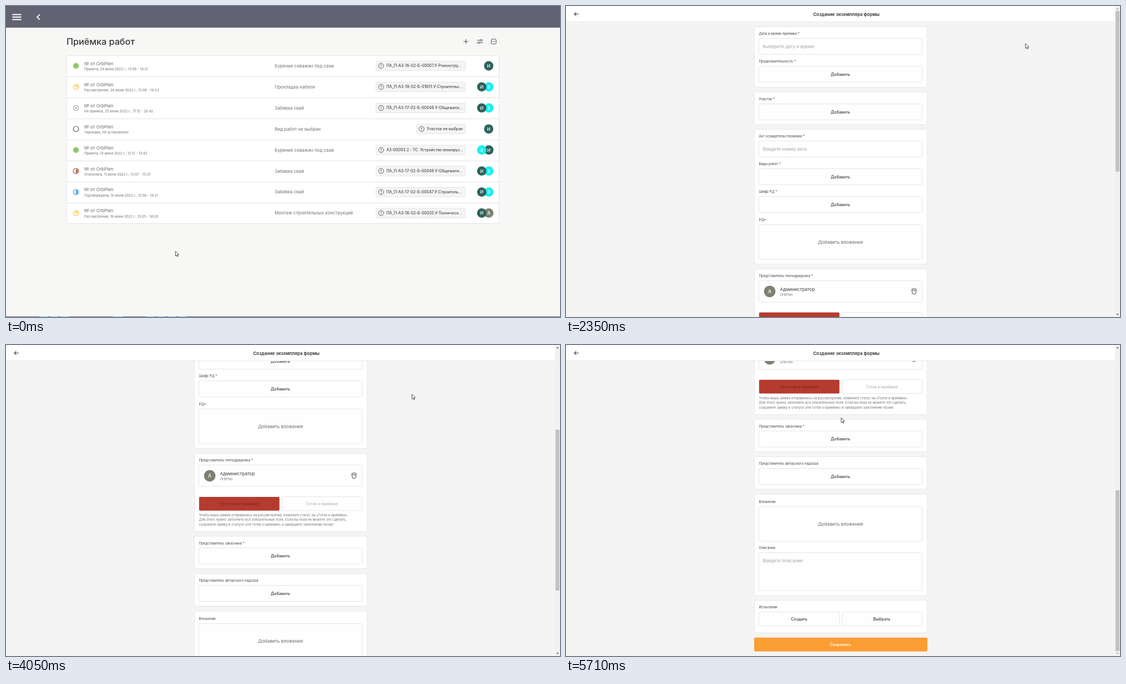
Recreate the animation shown at these times as an HTML page. Size 998 by 561 pixels, loop 5.74 s.

```html
<!DOCTYPE html>
<html lang="ru">
<head>
<meta charset="utf-8">
<title>Приёмка работ</title>
<style>
html, body { margin: 0; width: 100%; height: 100%; overflow: hidden; background: #f7f7f6; }
svg { display: block; width: 100vw; height: 100vh; }
text { font-family: Inter, "Open Sans", sans-serif; white-space: pre; }
</style>
</head>
<body>
<svg id="stage" viewBox="0 0 998 561" preserveAspectRatio="none"></svg>
<script>
const LOOP = 5740;
const OPEN_FORM = 2170;
const BRAND = 'OrbPlen';

// Drawing helpers; text is placed by the middle of its capitals.
const text = (x, y, s, size, fill = '#666', weight = 400, anchor = 'start') =>
  `<text x="${x}" y="${y + size * 0.36}" font-size="${size}" fill="${fill}" font-weight="${weight}" text-anchor="${anchor}">${s}</text>`;
const rect = (x, y, x2, y2, fill, stroke = 'none', r = 2) =>
  `<rect x="${x}" y="${y}" width="${x2 - x}" height="${y2 - y}" rx="${r}" fill="${fill}" stroke="${stroke}"/>`;
const circle = (x, y, r, fill, stroke = 'none', w = 1) =>
  `<circle cx="${x}" cy="${y}" r="${r}" fill="${fill}" stroke="${stroke}" stroke-width="${w}"/>`;
const line = (d, stroke, w = 1, cap = 'round') =>
  `<path d="${d}" fill="none" stroke="${stroke}" stroke-width="${w}" stroke-linecap="${cap}" stroke-linejoin="round"/>`;
const shape = (d, fill) => `<path d="${d}" fill="${fill}"/>`;
const group = (id, body) => `<g id="${id}">${body}</g>`;

// ---- List page ----
const status = {
  done: y => circle(126, y, 4.9, '#d5ecc5', '#6db843') + circle(126, y, 4, '#70bd42'),
  review: y => circle(126, y, 4.8, '#fdf3cf', '#f1c648', 1.2) +
    shape(`M126 ${y}v-3.4a3.4 3.4 0 0 1 3.4 3.4z`, '#f1bd2e'),
  refused: y => rect(121.8, y - 4.3, 130.2, y + 4.3, '#fff', '#77797f', 2) +
    line(`M124.4 ${y - 1.7}l3.3 3.4m0 -3.4l-3.3 3.4`, '#66686e'),
  draft: y => circle(126, y, 4.8, '#fff', '#33363b', 1.2),
  rejected: y => half(y, '#a4472f', '#f6e6e1'),
  confirmed: y => half(y, '#2d90d9', '#dff0fb')
};
const half = (y, c, light) => circle(126, y, 4.8, light, c, 1.2) +
  shape(`M126 ${y - 3.5}a3.5 3.5 0 0 1 0 7z`, c);

const avatarColor = { 'И': '#2d625c', 'З': '#1fedf0', 'А': '#7d8170' };
const avatar = (x, y, ch, r = 8.4, size = 8) =>
  circle(x, y, r, avatarColor[ch]) + text(x, y, ch, size, '#fff', 500, 'middle');

const rows = [
  ['done', 'Принята, 29 июня 2022 г., 13:06 - 14:21', 'Бурение скважин под сваи', 'ПА_П-АЗ-16-02-Б-00007.У-Реконстру...', 'И'],
  ['review', 'Рассмотрение, 24 июня 2022 г., 13:08 - 14:23', 'Прокладка кабеля', 'ПА_П-АЗ-18-02-Б-01651.У-Строительс...', 'ИЗ'],
  ['refused', 'Не принята, 25 июня 2022 г., 17:12 - 20:42', 'Забивка свай', 'ПА_П-АЗ-17-02-Б-00049.У-Общежити...', 'ИЗ'],
  ['draft', 'Черновик, Не установлено', 'Вид работ не выбран', 'Участок не выбран', 'И'],
  ['done', 'Принята, 14 июня 2022 г., 12:12 - 13:42', 'Бурение скважин под сваи', 'АЗ-00003.2 - ТС. Устройство межярус...', 'ЗИ'],
  ['rejected', 'Отклонена, 11 июня 2022 г., 13:07 - 13:37', 'Забивка свай', 'ПА_П-АЗ-17-02-Б-00049.У-Общежити...', 'ИЗ'],
  ['confirmed', 'Подтверждена, 10 июня 2022 г., 13:06 - 14:21', 'Забивка свай', 'ПА_П-АЗ-17-02-Б-00047.У-Строитель...', 'ИЗ'],
  ['review', 'Рассмотрение, 16 июня 2022 г., 13:05 - 14:20', 'Монтаж строительных конструкций', 'ПА_П-АЗ-16-02-Б-00035.У-Техническ...', 'ИА']
];
const ROW = 37.93;
const rowY = i => 108 + i * ROW;

function listRow([kind, sub, work, place, people], i) {
  const y = rowY(i);
  const left = kind === 'draft' ? 739.5 : 666.5;
  let s = i ? line(`M110 ${Math.round(y - ROW / 2) + 0.5}H888`, '#e3e3e5', 1, 'butt') : '';
  s += text(141, y - 4, '№ от ' + BRAND, 8, '#66676b');
  s += text(141, y + 6, sub, 6.05, '#6c6d72');
  s += text(484, y, work, 8, '#707176');
  s += rect(left, y - 8.5, 827.5, y + 8.5, '#f5f5f6', '#e3e3e5');
  s += circle(left + 9.2, y, 4.6, 'none', '#4a4b50', 0.9);
  s += line(`M${left + 9.2} ${y - 2.4}v2.7m0 2v.1`, '#4a4b50');
  s += text(left + 18.7, y, place, 6.9, '#45464b', 500);
  // The left avatar lies on top.
  if (people[1]) s += avatar(869.8, y, people[1]);
  return s + avatar(people[1] ? 857 : 869.5, y, people[0]);
}

function listPage() {
  const ink = '#4b4c51';
  let s = rect(0, 0, 998, 561, '#f7f7f6', 'none', 0) + rect(0, 0, 998, 39, '#616373', 'none', 0);
  s += line('M12 15.5h15M12 20h15M12 24.5h15', '#fff', 1.8);
  s += line('M60.5 15.8L56 20l4.5 4.2', '#fff', 1.8);
  s += text(109, 64, 'Приёмка работ', 16.2, '#36373b', 500);
  s += group('hover', rect(818, 54, 839, 74, '#ececec', 'none', 3) + circle(828.5, 64, 8.5, '#c9c9c9'));
  s += line('M824.8 64h7.6M828.6 60.2v7.6', ink);
  s += line('M849 61.8h5.2m3.4 0h1M849 66.2h1m3.4 0h5.2', ink);
  s += circle(855.9, 61.8, 1.6, 'none', ink) + circle(851.7, 66.2, 1.6, 'none', ink);
  s += rect(874, 59.5, 883, 68.5, 'none', ink, 2.5);
  s += [876.2, 878.5, 880.8].map(x => circle(x, 64, 0.7, ink)).join('');
  s += rect(109.5, 89.5, 888.5, 392.5, '#fff', '#e3e3e5');
  s += rows.map(listRow).join('');
  s += group('marks', rows.map((r, i) => status[r[0]](rowY(i))).join(''));
  s += group('tip',
    `<rect x="797" y="79" width="63" height="21.5" rx="2.5" fill="#fff" filter="url(#shade)"/>` +
    text(805.5, 89.5, 'Создать', 8.1, '#6d6e73') + rect(843, 83.5, 855, 95.5, '#efeff0') +
    text(849, 89.5, 'C', 5.8, '#77787c', 400, 'middle'));
  s += group('taskbar', rect(0, 560, 998, 561, '#5d6266', 'none', 0) +
    [[60, 76], [80, 94], [98, 113], [193, 211], [252, 267], [272, 287], [291, 306], [310, 325]]
      .map(([a, b]) => rect(a, 560, b, 561, '#74bde4', 'none', 0)).join(''));
  return s;
}

// ---- Form page ----
const L = 347.5, R = 641.5, MID = 494.5;
const EDGE = '#e5e5e6';
const card = (y, y2) => rect(339.5, y, 650.5, y2, '#fff', '#e8e8e9');
const label = (y, s) => text(L, y, s, 6.1, '#3f4044');
const box = (y, y2, x = L, x2 = R) => rect(x, y, x2, y2, '#fefefe', EDGE);
const bold = (x, y, s, fill = '#48494d') => text(x, y, s, 7.1, fill, 600, 'middle');
const button = (y, s = 'Добавить') => box(y, y + 29) + bold(MID, y + 14.5, s);
const input = (y, s) => box(y, y + 29) + text(354.5, y + 14.8, s, 8, '#a4a5a9');
const upload = y => box(y, y + 62.5) + text(MID, y + 31.3, 'Добавить вложения', 8.2, '#66676b', 400, 'middle');

function formBody() {
  let s = card(37.5, 146.5) + label(50, 'Дата и время приёмки *') + input(58.5, 'Выберите дату и время');
  s += label(100, 'Продолжительность *') + button(108.5);
  s += card(155, 213.5) + label(167.5, 'Участок *') + button(176.5);
  s += card(222.5, 465.5) + label(235, 'Акт освидетельствования *') + input(243.5, 'Введите номер акта');
  s += label(285, 'Виды работ *') + button(293.5);
  s += label(335, 'Шифр РД *') + button(343.5);
  s += label(386, 'РД*') + upload(394.5);

  s += card(474.5, 615.5) + label(487, 'Представитель генподрядчика *') + box(495.5, 534);
  s += avatar(367, 514.8, 'А', 10.4, 8.4);
  s += text(385.5, 510.8, 'Администратор', 8.1, '#3a3b3f') + text(385.5, 520.5, BRAND, 6, '#77787c');
  s += `<path d="M622.8 511.5l1.2 7q.3 1.3 1.6 1.3h2.8q1.3 0 1.6-1.3l1.2-7" fill="#e9e9e9" stroke="#55565a"/>`;
  s += `<ellipse cx="627" cy="511.3" rx="4.4" ry="1.5" fill="#fff" stroke="#45464a"/>`;
  s += rect(347.8, 552.8, 492.6, 577.6, '#b53b2f') + text(420, 565.2, 'Не готов к приёмке', 7.2, '#7c2a23', 500, 'middle');
  s += box(552.5, 577.5, 497.5) + text(569, 565.2, 'Готов к приёмке', 7.1, '#b2b3b6', 500, 'middle');
  s += ['Чтобы ваша заявка отправилась на рассмотрение, измените статус на «Готов к приёмке».',
    'Для этого нужно заполнить все обязательные поля. Если вы пока не можете это сделать,',
    'сохраните заявку в статусе «Не готов к приёмке» и завершите заполнение позже.']
    .map((t, i) => text(L, 585.7 + i * 8.4, t, 6, '#717276')).join('');

  s += card(624, 682.5) + label(636.5, 'Представитель заказчика *') + button(645);
  s += card(691.5, 750) + label(704, 'Представитель авторского надзора') + button(712.5);
  s += card(759, 942) + label(773, 'Вложения') + upload(781.5);
  s += label(856.3, 'Описание') + box(864.5, 933) + text(354.5, 879.3, 'Введите описание', 8, '#a4a5a9');
  s += card(950.5, 1009) + label(963, 'Испытания');
  s += box(971.5, 996.5, L, 492.5) + bold(420, 984, 'Создать');
  s += box(971.5, 996.5, 497.5) + bold(569, 984, 'Выбрать');
  return s + rect(339, 1017.7, 651, 1042.7, '#fa9d33', 'none', 2.5) + bold(MID, 1030.2, 'Сохранить', '#fff');
}

function formPage() {
  let s = rect(0, 0, 998, 561, '#f4f4f4', 'none', 0) + group('body', formBody());
  s += rect(0, 0, 989, 28, '#fff', 'none', 0) + rect(0, 28, 989, 29, '#e9e9ea', 'none', 0);
  s += line('M22.6 14.5H15m3.2-3.2L15 14.5l3.2 3.2', '#3f4044', 1.1);
  s += text(505, 14.7, 'Создание экземпляра формы', 8, '#303135', 600, 'middle');
  s += rect(989, 0, 998, 561, '#f1f1f1', 'none', 0);
  s += '<path id="up" d="M991.3 6l2.2-2.5 2.2 2.5z"/><path id="down" d="M991.3 555.2l2.2 2.5 2.2-2.5z"/>';
  return s + `<rect id="thumb" x="990" width="7" height="290" fill="#c1c1c1"/>`;
}

// ---- Pointer ----
const arrow = `<path d="M.3.3V9l2-1.8 1.3 2.9 1.5-.7-1.3-2.8h2.7z" fill="#fff" stroke="#222" stroke-width=".8"/>`;
const hand = `<path d="M-.9 1.2q.9-1.3 1.8 0v3.3q.9-.5 1.5.2.9-.4 1.4.4 1.3-.3 1.4 1V8.4q0 1.6-1.1 2.8v1H-.8v-1L-3.6 7.5q-.3-1.3 1-1.2l1.7 1.3z" fill="#fff" stroke="#222" stroke-width=".8"/>`;

const stage = document.getElementById('stage');
stage.innerHTML = `<defs><filter id="shade" x="-20%" y="-40%" width="140%" height="190%">
  <feDropShadow dx="0" dy="1" stdDeviation="1.8" flood-color="#000" flood-opacity=".22"/></filter></defs>` +
  group('list', listPage()) + group('form', formPage()) + group('arrow', arrow) + group('hand', hand);
const el = Object.fromEntries([...stage.querySelectorAll('[id]')].map(e => [e.id, e]));

// Keys are [time, value...]; the curve passes them without overshoot.
function track(keys, t, k = 1) {
  const n = keys.length - 1;
  if (t <= keys[0][0]) return keys[0][k];
  if (t >= keys[n][0]) return keys[n][k];
  const i = keys.findIndex(p => p[0] > t) - 1;
  const slope = j => (keys[j + 1][k] - keys[j][k]) / (keys[j + 1][0] - keys[j][0]);
  const tangent = j => {
    if (j === 0 || j === n) return 0;
    const a = slope(j - 1), b = slope(j);
    return a * b > 0 ? 2 * a * b / (a + b) : 0;
  };
  const h = keys[i + 1][0] - keys[i][0], u = (t - keys[i][0]) / h, v = 1 - u;
  return keys[i][k] * v * v * (1 + 2 * u) + keys[i + 1][k] * u * u * (3 - 2 * u) +
    h * u * v * (tangent(i) * v - tangent(i + 1) * u);
}

const pointer = [
  [170, 305, 442], [730, 432, 100], [850, 441, 69], [940, 462, 64], [1320, 813, 50],
  [1560, 826, 62], [1900, 827.5, 67.5], [2500, 827.5, 67.5], [3270, 745.5, 78], [3620, 731, 88.5]
];
const scrolling = [
  [3060, 0], [3270, 92], [3620, 208], [3840, 208], [4050, 278.5], [4330, 429.5], [4510, 490]
];
const ramp = (t, a, b) => Math.min(1, Math.max(0, (t - a) / (b - a)));
const show = (e, on) => e.setAttribute('visibility', on ? 'visible' : 'hidden');

function draw(t) {
  const form = t >= OPEN_FORM;
  el.list.setAttribute('display', form ? 'none' : 'inline');
  el.form.setAttribute('display', form ? 'inline' : 'none');

  el.marks.setAttribute('opacity', 0.82 + 0.18 * ramp(t, 180, 1320));
  el.hover.setAttribute('opacity', ramp(t, 1400, 1520));
  el.tip.setAttribute('opacity', ramp(t, 1640, 1760));
  show(el.taskbar, !form && t < 1400);

  const y = track(scrolling, t);
  el.body.setAttribute('transform', `translate(0 ${-y})`);
  el.thumb.setAttribute('y', 8.7 + y * 0.517);
  el.up.setAttribute('fill', y > 0 ? '#505050' : '#a3a3a3');
  el.down.setAttribute('fill', y < 490 ? '#505050' : '#a3a3a3');

  const out = ramp(t, 5590, 5710);
  const px = track(pointer, t, 1) - 235.5 * out;
  const py = track(pointer, t, 2) + 42.5 * out;
  const over = t >= 1400 && !form;
  show(el.arrow, !over);
  show(el.hand, over);
  for (const e of [el.arrow, el.hand]) e.setAttribute('transform', `translate(${px} ${py})`);
}

const start = performance.now();
function tick() {
  draw((performance.now() - start) % LOOP);
  requestAnimationFrame(tick);
}
tick();
</script>
</body>
</html>
```
